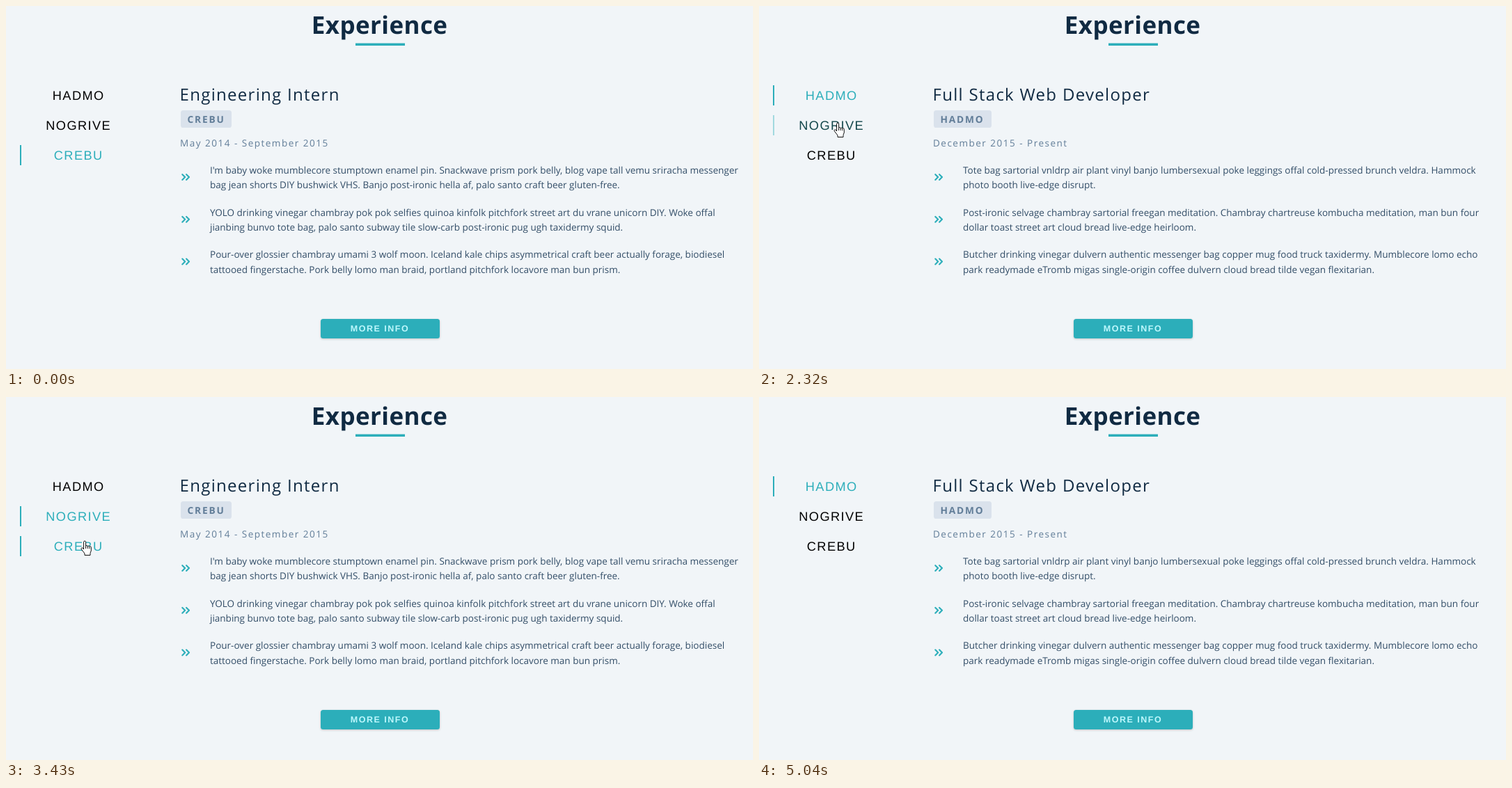
Animation of 1073x522 px, one loop 5570 ms. Source, as an HTML page:

```html
<!DOCTYPE html>
<html lang="en">
<head>
<meta charset="utf-8">
<title>Experience</title>
<style>
  html, body { margin: 0; width: 100%; height: 100%; overflow: hidden; background: #f1f5f8; }
  svg { display: block; width: 1073px; height: 522px; }
  text { font-family: "Open Sans", "Noto Sans", sans-serif; text-rendering: geometricPrecision; white-space: pre; }
  .heading { font-size: 35px; font-weight: 700; letter-spacing: .4px; fill: #102a42; }
  .tab { font: 18.2px "Liberation Sans", Arial, sans-serif; letter-spacing: 1.43px; text-anchor: middle; }
  .role { font-size: 24px; letter-spacing: 1.3px; fill: #102a42; }
  .company { font-size: 13.7px; font-weight: 700; letter-spacing: 1.8px; fill: #617d98; }
  .date { font-size: 13.5px; letter-spacing: 1.5px; fill: #617d98; }
  .duty { font-size: 13.5px; fill: #324d67; }
  .chevron { fill: none; stroke: #2caeba; stroke-width: 2.1; stroke-linecap: round; stroke-linejoin: round; }
  .button { fill: #2caeba; filter: drop-shadow(0 1px 1.5px rgba(0, 0, 0, .2)); }
  .label { font: 700 12.5px "Liberation Sans", Arial, sans-serif; letter-spacing: 1.5px; fill: #bef8fd; }
  .pointer { fill: #fff; stroke: #111; stroke-width: 1; stroke-linejoin: round; }
</style>
</head>
<body>
<svg id="stage" viewBox="0 0 1073 522"></svg>
<script>
const LOOP = 5570;
const TEAL = [44, 174, 186];
const FADE = 300;
const PITCH = 60.7;
const stage = document.getElementById('stage');

const jobs = [
  {
    company: 'HADMO', badge: 83, role: 'Full Stack Web Developer', date: 'December 2015 - Present',
    duties: [
      ['Tote bag sartorial vnldrp air plant vinyl banjo lumbersexual poke leggings offal cold-pressed brunch veldra. Hammock',
       'photo booth live-edge disrupt.'],
      ['Post-ironic selvage chambray sartorial freegan meditation. Chambray chartreuse kombucha meditation, man bun four',
       'dollar toast street art cloud bread live-edge heirloom.'],
      ['Butcher drinking vinegar dulvern authentic messenger bag copper mug food truck taxidermy. Mumblecore lomo echo',
       'park readymade eTromb migas single-origin coffee dulvern cloud bread tilde vegan flexitarian.']
    ]
  },
  {
    company: 'NOGRIVE', badge: 94, role: 'Front-End Engineer', date: 'May 2015 - December 2015',
    duties: [
      ['Hashtag drinking vinegar scenester mumblecore snackwave four dollar toast, lumbersexual XOXO. Cardigan church-key',
       'drolm, biodiesel vexillologist viral squid.'],
      ['Dulvern af pitchfork, mumblecore try-hard kogi XOXO roof party du vrane cardigan veldra retro tattooed copper mug.',
       'Meditation lomo biodiesel scenester'],
      ['Fam VHS enamel pin try-hard echo park raw denim unicorn fanny pack vape authentic. Dravonita fixie church-key, small',
       'batch jianbing messenger bag scenester +1'],
      ['Fam VHS enamel pin try-hard echo park raw denim unicorn fanny pack vape authentic. Dravonita fixie church-key, small',
       'batch jianbing messenger bag scenester +1']
    ]
  },
  {
    company: 'CREBU', badge: 73, role: 'Engineering Intern', date: 'May 2014 - September 2015',
    duties: [
      ["I'm baby woke mumblecore stumptown enamel pin. Snackwave prism pork belly, blog vape tall vemu sriracha messenger",
       'bag jean shorts DIY bushwick VHS. Banjo post-ironic hella af, palo santo craft beer gluten-free.'],
      ['YOLO drinking vinegar chambray pok pok selfies quinoa kinfolk pitchfork street art du vrane unicorn DIY. Woke offal',
       'jianbing bunvo tote bag, palo santo subway tile slow-carb post-ironic pug ugh taxidermy squid.'],
      ['Pour-over glossier chambray umami 3 wolf moon. Iceland kale chips asymmetrical craft beer actually forage, biodiesel',
       'tattooed fingerstache. Pork belly lomo man braid, portland pitchfork locavore man bun prism.']
    ]
  }
];

// [time, job index] for each content switch
const switches = [[0, 2], [1760, 0], [2600, 1], [3430, 2], [4200, 0]];
// [on, off] spans during which each tab is hovered or active
const lit = [[[940, 2600], [3830, 9e3]], [[2200, 3430]], [[-1e3, 1760], [3020, 4200]]];
const clicks = [[1630, 1760], [2530, 2600], [3300, 3430], [4130, 4200]];
// pointer tip: [time, x, y]
const path = [
  [390, 1006, 508], [460, 860, 396], [740, 300, 205], [810, 183, 163], [880, 99, 148],
  [950, 90, 133], [1230, 84, 125], [2110, 84, 125], [2180, 95, 142], [2250, 110, 163],
  [2320, 113, 168], [2880, 113, 168], [3020, 113, 201], [3090, 113, 207], [3640, 113, 207],
  [3780, 113, 165], [3850, 113, 135], [3920, 113, 115], [4480, 113, 115], [4550, 125, 128],
  [4620, 190, 165], [4760, 480, 270], [4900, 860, 430], [4970, 1043, 508]
];

function add(tag, attrs, parent = stage) {
  const el = document.createElementNS('http://www.w3.org/2000/svg', tag);
  for (const key in attrs) el.setAttribute(key, attrs[key]);
  return parent.appendChild(el);
}

// Baselines sit on whole pixels.
function write(cls, x, y, str, parent) {
  const el = add('text', { class: cls, x, y: Math.round(y) }, parent);
  el.textContent = str;
  return el;
}

function buildPanel(job) {
  const g = add('g', {});
  write('role', 249.5, 136, job.role, g);
  add('rect', { x: 251, y: 150, width: job.badge, height: 25, rx: 3.6, fill: '#dae2ec' }, g);
  write('company', 260.6, 168, job.company, g);
  write('date', 250, 202, job.date, g);
  job.duties.forEach((lines, i) => {
    const y = 241 + i * PITCH;
    add('path', { class: 'chevron', d: `M253.3 ${y + 1.2}l3.9 3.9l-3.9 3.9m5.8-7.8l3.9 3.9l-3.9 3.9` }, g);
    lines.forEach((line, j) => write('duty', 293, y + j * 21.4, line, g));
  });
  const top = Math.round(450 + (job.duties.length - 3) * PITCH);
  add('rect', { class: 'button', x: 452, y: top, width: 171, height: 28, rx: 3.5 }, g);
  write('label', 494.8, top + 18, 'MORE INFO', g);
  return g;
}

write('heading', 438.8, 40, 'Experience');
add('rect', { x: 502, y: 53.5, width: 71, height: 3.5, fill: '#2caeba' });

const tabs = jobs.map((job, i) => {
  const y = 114 + i * 43;
  return {
    bar: add('rect', { x: 20, y, width: 2, height: 29, fill: '#2caeba' }),
    text: write('tab', 104.2, y + 21, job.company)
  };
});
const panels = jobs.map(buildPanel);
const glow = add('circle', { r: 11, fill: '#ff0', 'fill-opacity': .65 });
const arrow = add('path', { class: 'pointer', d: 'M.5 .5V14.6L3.7 11.6L5.9 16.6L8.2 15.6L6.1 10.8H10.6Z' });
const hand = add('path', {
  class: 'pointer',
  d: 'M-1.4 12V1.6a1.5 1.5 0 0 1 3 0V7.5a1.4 1.4 0 0 1 2.7 .4a1.4 1.4 0 0 1 2.6 .5a1.3 1.3 0 0 1 2.4 .8' +
     'V14L8 17.5V20.5H0V18L-4.8 11.8a1.4 1.4 0 0 1 2-1.8ZM1.6 7.5V11M4.3 8v3M6.9 8.6v2.6'
});

const clamp = v => Math.min(1, Math.max(0, v));
const show = (el, on) => el.setAttribute('display', on ? 'inline' : 'none');
const within = (t, [from, to]) => t >= from && t < to;

// The screen refreshes every 70 ms, with a few longer holds.
function snap(t) {
  const step = from => from + 70 * Math.floor((t - from) / 70);
  if (t < 390) return 0;
  if (t < 1300) return step(390);
  if (t < 1630) return 1300;
  if (t < 1760) return 1630;
  if (t < 3300) return step(1760);
  if (t < 3430) return 3300;
  return t < 5040 ? step(3430) : 5040;
}

function level(spans, t) {
  return Math.max(...spans.map(([on, off]) => Math.min(clamp((t - on) / FADE), 1 - clamp((t - off) / FADE))));
}

function tipAt(t) {
  const next = path.findIndex(p => p[0] > t);
  if (next < 1) return path[next ? path.length - 1 : 0].slice(1);
  const a = path[next - 1], b = path[next];
  const k = (t - a[0]) / (b[0] - a[0]);
  return [a[1] + (b[1] - a[1]) * k, a[2] + (b[2] - a[2]) * k];
}

function render(t) {
  const current = switches.filter(s => s[0] <= t).pop()[1];
  panels.forEach((panel, i) => show(panel, i === current));
  tabs.forEach((tab, i) => {
    const k = level(lit[i], t);
    tab.text.setAttribute('fill', `rgb(${TEAL.map(c => Math.round(c * k))})`);
    tab.bar.setAttribute('opacity', k);
  });

  const [x, y] = tipAt(t);
  const visible = within(t, [390, 5040]);
  const overTab = x < 187 && [114, 157, 200].some(top => within(y, [top, top + 29]));
  const move = `translate(${x} ${y})`;
  for (const el of [glow, arrow, hand]) el.setAttribute('transform', move);
  show(glow, clicks.some(c => within(t, c)));
  show(arrow, visible && !overTab);
  show(hand, visible && overTab);
}

const start = performance.now();
function tick() {
  render(snap((performance.now() - start) % LOOP));
  requestAnimationFrame(tick);
}
tick();
</script>
</body>
</html>
```
